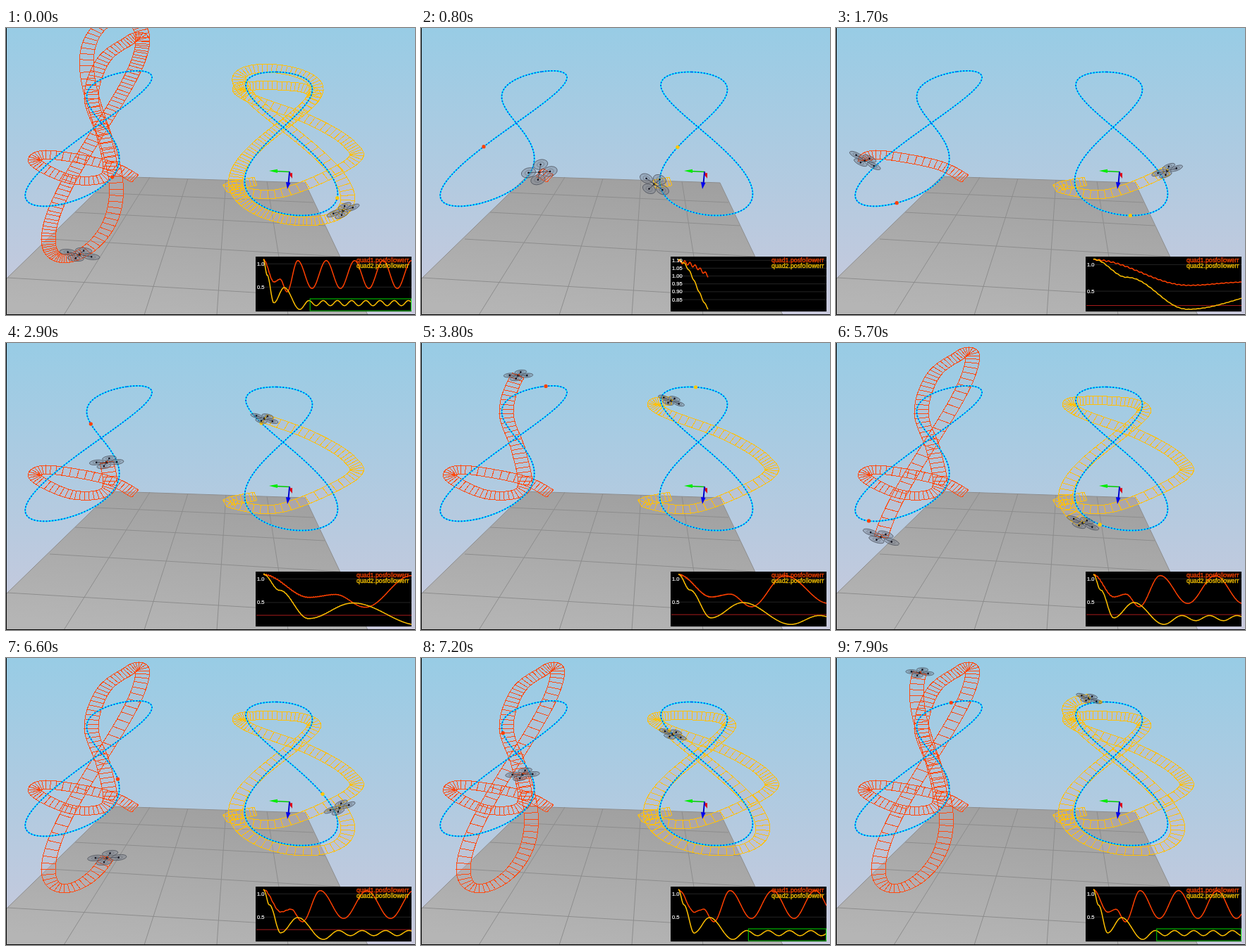
An HTML page that plays this animation: 580 by 408 pixels, repeating every 8000 ms.

```html
<!DOCTYPE html>
<html lang="en">
<head>
<meta charset="utf-8">
<title>Quadcopter path following</title>
<style>
  html, body { margin: 0; width: 100%; height: 100%; overflow: hidden; }
  svg { display: block; width: 580px; height: 408px; }
  text { font-family: "Liberation Sans", Arial, sans-serif; }
</style>
</head>
<body>
<svg viewBox="0 0 580 408">
  <defs>
    <linearGradient id="sky" x1="0" y1="0" x2="0" y2="1">
      <stop offset="0" stop-color="#98cce5"/><stop offset="1" stop-color="#c9c9dc"/>
    </linearGradient>
    <linearGradient id="ground" x1="0.6" y1="0" x2="0.3" y2="1">
      <stop offset="0" stop-color="#a0a0a0"/><stop offset="1" stop-color="#b5b5b5"/>
    </linearGradient>
    <clipPath id="panelClip"><rect x="354" y="325" width="221" height="78"/></clipPath>
  </defs>
  <rect width="580" height="408" fill="url(#sky)"/>
  <path d="M150 211L424 220L513 408H0V357Z" fill="url(#ground)"/>
  <path d="M150 211L424 220L513 408M150 211L0 357M204 212L82 408M258 214L196 408M312 216L299 408M370 218L400 408
    M127 234L436 248M98 262L452 281M62 300L473 325M2 355L502 385" fill="none" stroke="#8d8d8d"/>
  <g id="trails" shape-rendering="crispEdges"></g>
  <g id="routes" fill="none"></g>
  <g id="drones"></g>
  <g stroke-linecap="round">
    <path d="M402 204.5L382 203.5" stroke="#0c0" stroke-width="1.5"/>
    <path d="M373 203L385 200.8V206Z" fill="#0e0"/>
    <path d="M402 205L404 210" stroke="#d00" stroke-width="2"/>
    <path d="M401 207L406 206V214Z" fill="#e00014"/>
    <path d="M402 205L400.5 221" stroke="#00c" stroke-width="2"/>
    <path d="M397 219L403.5 220L399 229Z" fill="#00e"/>
  </g>
  <rect x="354" y="325" width="221" height="78"/>
  <g clip-path="url(#panelClip)" fill="none">
    <path id="grid" stroke="#242424"/>
    <path id="limit" stroke="#a81c1c"/>
    <path id="error1" stroke="#ff4000" stroke-width="1.5"/>
    <path id="error2" stroke="#ffc000" stroke-width="1.5"/>
    <rect id="settled" y="385" height="17" stroke="#00d800"/>
  </g>
  <g id="ticks" font-size="7.5" fill="#fff" stroke="#fff" stroke-width=".2"></g>
  <g font-size="8.8" stroke-width=".3">
    <text x="497" y="333" fill="#ff4500" stroke="#ff4500">quad1.posfollowerr</text>
    <text x="497" y="341" fill="#ffc800" stroke="#ffc800">quad2.posfollowerr</text>
  </g>
  <path d="M.5 0V407.5H580" fill="none" stroke="#000"/>
</svg>
<script>
const { sin, cos, min, max, floor, ceil, exp, hypot, PI } = Math;
const byId = id => document.getElementById(id);
const clamp = k => min(1, max(0, k));
const mix = (a, b, k) => a + (b - a) * k;
const swing = k => (1 - cos(PI * k)) / 2;
const line = list => 'M' + list.map(p => p.map(v => v.toFixed(1)).join(' ')).join('L');

// Figure eight seen in perspective: crossing x/y, length axis, width axis, and depth along each.
const eight = (x, y, lengthX, lengthY, wideX, wideY, depthL, depthW) => degrees => {
  const a = degrees * PI / 180, c = cos(a), s = sin(2 * a);
  const w = 1 + depthL * c + depthW * s;
  return [(x + lengthX * c + wideX * s) / w, (y + lengthY * c + wideY * s) / w];
};

// Catmull-Rom curve through points a fixed time step apart.
function spline(list, pos) {
  const i = min(floor(pos), list.length - 2), k = min(1, pos - i);
  const [a, b, c, d] = [-1, 0, 1, 2].map(o => list[max(0, min(list.length - 1, i + o))]);
  return [0, 1].map(n => b[n] + k / 2 * (c[n] - a[n]
    + k * (2 * a[n] - 5 * b[n] + 4 * c[n] - d[n] + k * (3 * (b[n] - c[n]) + d[n] - a[n]))));
}

const RUNG = 0.045;
const LIMIT = 0.23;
const KEY_STEP = 0.4;
const phase = t => 90 + 85.5 * t;
const wave = (t, peak, period) => cos(2 * PI * (t - peak) / period);

// Each quad flies from its start along `launch`, then settles on its own `orbit`.
const quads = [{
  color: '#ff4a10', dot: '#ff4000', lag: 34, centre: 120, size: 1,
  route: eight(135, 135, 76, -58.9, 54.3, -6, .2275, .018),
  orbit: eight(135.4, 140, 44, -155, 49.7, 0, .089, .057),
  launch: [[183, 214], [142, 194], [58, 180], [44, 193], [96, 216], [145, 208], [139, 155], [121, 99], [138, 46], [175, 19], [194, 23]],
  errorStart: [[0, 1.09], [.71, .61], [1.12, .67], [1.58, .4], [2.3, 1.07]],
  errorLater: t => .77 + .3 * wave(t, 2.3, 1.9),
  ripple: .012
}, {
  color: '#ffc008', dot: '#ffc800', lag: 8, centre: 405, size: .9,
  route: eight(393, 141, 78.7, -64.2, 46.8, 0, .2285, -.02),
  orbit: eight(393, 138, 89, -65, 64.5, 6, .26, 0),
  launch: [[354, 218], [317, 227], [389, 235], [488, 192], [487, 165], [431, 131], [350, 101], [331, 86], [355, 82], [409, 84], [439, 97]],
  errorStart: [[0, 1.1], [.25, .76], [.7, .16], [1.39, .49], [2.43, .02], [3.05, .21]],
  errorLater: t => .155 + .055 * wave(t, 3.05, .95),
  ripple: .006
}];

function position(q, t) {
  const a = spline(q.launch, t / KEY_STEP), b = q.orbit(phase(t) - q.lag);
  const k = swing(clamp((t - 3.5) / .8));
  return [0, 1].map(n => mix(a[n], b[n], k));
}

// The two ribbon edges lie on either side of the direction of travel.
function edges(q, t) {
  const [x, y] = position(q, t), [x0, y0] = position(q, max(0, t - .03)), [x1, y1] = position(q, t + .03);
  const dx = x1 - x0, dy = y1 - y0, d = hypot(dx, dy) || 1;
  const ox = -dy / d * 10, oy = dx / d * 6;
  return [[x + ox, y + oy], [x - ox, y - oy]];
}

byId('routes').innerHTML = quads.map(q => {
  const d = line(Array.from({ length: 181 }, (_, i) => q.route(i * 2)));
  return `<path d="${d}" stroke="#00e4ff" stroke-width="1.8"/>
    <path d="${d}" stroke="#0020e0" stroke-width="1.7" stroke-dasharray="1.4 2.900"/>`;
}).join('');

function trailMarkup(q, time) {
  const pairs = Array.from({ length: ceil(time / RUNG) }, (_, i) => edges(q, i * RUNG));
  pairs.push(edges(q, time));
  const a = pairs.map(p => p[0]), b = pairs.map(p => p[1]);
  const area = line(a.concat([...b].reverse())) + 'Z';
  return `<path d="${area}" fill="#c8b4be" opacity=".28"/>
    <path d="${line(a)}${line(b)}${pairs.map(line).join('')}" fill="none" stroke="${q.color}"/>`;
}

function droneMarkup(q, time) {
  const [x, y] = position(q, time);
  const arm = (12 + y * .018) * q.size, squash = .35 + .7 * exp(-4 * time);
  const tilt = (q.centre - x) * .32;
  const hubs = [0, 1, 2, 3].map(i => {
    const a = .3 + i * PI / 2;
    return [arm * cos(a), arm * squash * sin(a)];
  });
  const rx = arm * .66, ry = rx * squash;
  const rotors = hubs.map(([hx, hy]) => `<g transform="translate(${hx} ${hy})">
    <ellipse rx="${rx}" ry="${ry}" fill="#70788a" fill-opacity=".38" stroke="#4a4e58" stroke-width=".7"/>
    <ellipse rx="${rx / 2}" ry="${ry / 2}" fill="none" stroke="#60656f" stroke-width=".5"/>
    <circle r="1.300" fill="#10101c"/></g>`).join('');
  const [dotX, dotY] = q.route(phase(time));
  return `<circle cx="${dotX}" cy="${dotY}" r="2.600" fill="${q.dot}"/>
    <g transform="translate(${x} ${y}) rotate(${tilt})">
      <path d="${hubs.map(h => line([[0, 0], h])).join('')}" stroke="#3a3c46"/>
      ${rotors}<circle r="1.800" fill="#22242c"/><circle cx="1" cy="-1" r="1" fill="${q.dot}"/></g>`;
}

function errorAt(q, t) {
  const keys = q.errorStart, next = keys.findIndex(k => k[0] > t);
  if (next < 0) return q.errorLater(t);
  const [t0, v0] = keys[next - 1], [t1, v1] = keys[next];
  return mix(v0, v1, swing((t - t0) / (t1 - t0))) + q.ripple * sin(t * 180) * exp(-t);
}

function drawPlot(time) {
  const span = max(1, time), top = 1.11;
  const steps = max(2, ceil(time / span * 210));
  const curves = quads.map(q => Array.from({ length: steps + 1 }, (_, i) => {
    const t = time * i / steps;
    return [365 + t / span * 210, errorAt(q, t)];
  }));
  const low = min(1.05, ...curves[1].map(p => p[1]));
  const range = top - low;
  const toY = v => 328 + (top - v) * 72 / range;
  curves.forEach((c, i) => byId('error' + (i + 1)).setAttribute('d', line(c.map(([x, v]) => [x, toY(v)]))));

  const gap = range < .34 ? .05 : range < .6 ? .1 : range < .85 ? .2 : .5;
  let grid = '', ticks = '';
  for (let n = floor(1.101 / gap); n * gap > low + range * .08; n--) {
    const y = toY(n * gap);
    grid += `M365 ${y}H575`;
    ticks += `<text x="356" y="${y + 2.5}">${(n * gap).toFixed(gap < .1 ? 2 : 1)}</text>`;
  }
  byId('grid').setAttribute('d', grid);
  byId('ticks').innerHTML = ticks;

  const settled = time > 6.5, x = 365 + 3.12 / span * 210;
  byId('limit').setAttribute('d', settled || low > LIMIT ? '' : `M355 ${toY(LIMIT)}H575`);
  const box = byId('settled');
  box.setAttribute('visibility', settled ? 'visible' : 'hidden');
  box.setAttribute('x', x);
  box.setAttribute('width', 574.5 - x);
}

function draw(ms) {
  let t = floor(ms % 8000 / 100) / 10;
  if (t > 2.4 && t < 2.9) t = 2.4; // the view stalls here while the flight goes on
  const time = t < .6 ? t + 9.9 : t - .6;
  byId('trails').innerHTML = quads.map(q => trailMarkup(q, time)).join('');
  byId('drones').innerHTML = quads.map(q => droneMarkup(q, time)).join('');
  drawPlot(time);
}

let start;
function frame(now) {
  start ??= now;
  draw(now - start);
  requestAnimationFrame(frame);
}
draw(0);
requestAnimationFrame(frame);
</script>
</body>
</html>
```
